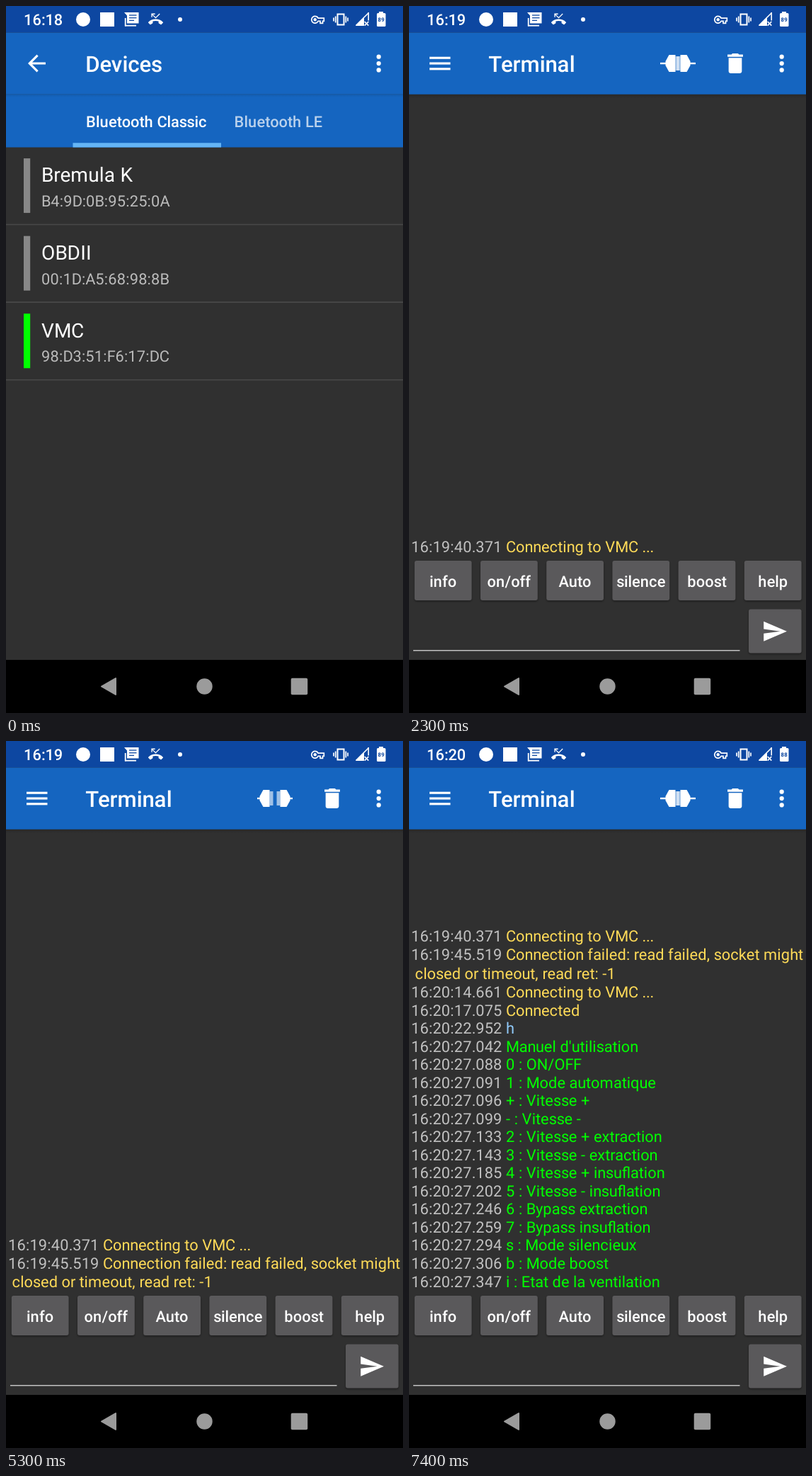
Write an HTML page with a canvas that moves like this. It is 561 px wide and 998 px high and loops after 8 s.

```html
<!DOCTYPE html>
<html lang="en">
<head>
<meta charset="utf-8">
<title>Bluetooth terminal</title>
<style>
  html, body { margin: 0; width: 100%; height: 100%; overflow: hidden; background: #303030; }
  canvas { display: block; width: 561px; height: 998px; }
</style>
</head>
<body>
<canvas id="stage"></canvas>
<script>
const W = 561, H = 998, LOOP = 8000;
const DP = W / 360, PHONE_PX = W / 720;
const canvas = document.getElementById('stage');
const ctx = canvas.getContext('2d');
const ratio = window.devicePixelRatio || 1;
canvas.width = W * ratio;
canvas.height = H * ratio;

const WHITE = '#fff', PANEL = '#303030', BAR = '#1565c0', STATUS = '#0d47a1';
const GREY = '#c1c1c1', YELLOW = '#ffdb58', GREEN = '#00ff00', BLUE = '#90caf9';
const STATUS_END = 24 * DP, BAR_END = 80 * DP, TABS_END = 128 * DP, BAR_MID = 52 * DP;
const SMALL = 14, LINE = 25.53, LAST_BASELINE = 770.5;

const ICONS = {
  back: 'M20 11H7.83l5.59-5.59L12 4l-8 8 8 8 1.41-1.41L7.83 13H20z',
  trash: 'M6 19c0 1.1.9 2 2 2h8c1.1 0 2-.9 2-2V7H6zM19 4h-3.5l-1-1h-5l-1 1H5v2h14z',
  send: 'M2 21 23 12 2 3v7l15 2-15 2z',
  missed: 'M6.5 5.5 12 11l7-7-1-1-6 6-4.5-4.5H11V3H5v6h1.5z' +
    'M.3 16.7Q5 12 12 12t11.7 4.7q.6.7 0 1.4l-2.5 2.5q-.7.6-1.4 0l-2.7-1.9q-.5-.3-.5-.9v-2.3' +
    'Q12 14.2 7.4 15.5v2.3q0 .6-.5.9l-2.7 1.9q-.7.6-1.4 0L.3 18.1q-.6-.7 0-1.4z'
};
for (const name in ICONS) ICONS[name] = new Path2D(ICONS[name]);

// Log entries: time, message, colour, optional wrapped remainder.
const LOG = [
  ['16:19:40.371', 'Connecting to VMC ...', YELLOW],
  ['16:19:45.519', 'Connection failed: read failed, socket might', YELLOW, ' closed or timeout, read ret: -1'],
  ['16:20:14.661', 'Connecting to VMC ...', YELLOW],
  ['16:20:17.075', 'Connected', YELLOW],
  ['16:20:22.952', 'h', BLUE],
  ['16:20:27.042', "Manuel d'utilisation", GREEN],
  ['16:20:27.088', '0 : ON/OFF', GREEN],
  ['16:20:27.091', '1 : Mode automatique', GREEN],
  ['16:20:27.096', '+ : Vitesse +', GREEN],
  ['16:20:27.099', '- : Vitesse -', GREEN],
  ['16:20:27.133', '2 : Vitesse + extraction', GREEN],
  ['16:20:27.143', '3 : Vitesse - extraction', GREEN],
  ['16:20:27.185', '4 : Vitesse + insuflation', GREEN],
  ['16:20:27.202', '5 : Vitesse - insuflation', GREEN],
  ['16:20:27.246', '6 : Bypass extraction', GREEN],
  ['16:20:27.259', '7 : Bypass insuflation', GREEN],
  ['16:20:27.294', 's : Mode silencieux', GREEN],
  ['16:20:27.306', 'b : Mode boost', GREEN],
  ['16:20:27.347', 'i : Etat de la ventilation', GREEN]
];

const DEVICES = [
  ['Bremula K', 'B4:9D:0B:95:25:0A', '#888'],
  ['OBDII', '00:1D:A5:68:98:8B', '#888'],
  ['VMC', '98:D3:51:F6:17:DC', GREEN]
];

const SCENES = [
  { until: 500, clock: '16:18', battery: '89', draw: drawDevices },
  { until: 3500, clock: '16:19', battery: '89', draw: () => drawTerminal(1, true) },
  { until: 6500, clock: '16:19', battery: '89', draw: () => drawTerminal(2, false) },
  { until: LOOP, clock: '16:20', battery: '88', draw: () => drawTerminal(LOG.length, true) }
];

function rect(x, y, w, h, color, radius = 0) {
  ctx.fillStyle = color;
  ctx.beginPath();
  ctx.roundRect(x, y, w, h, radius);
  ctx.fill();
}

function circle(x, y, r, color) {
  ctx.fillStyle = color;
  ctx.beginPath();
  ctx.arc(x, y, r, 0, Math.PI * 2);
  ctx.fill();
}

function polygon(color, ...points) {
  ctx.fillStyle = color;
  ctx.beginPath();
  points.forEach(([x, y]) => ctx.lineTo(x, y));
  ctx.closePath();
  ctx.fill();
}

function line(x1, y1, x2, y2, color, width) {
  ctx.strokeStyle = color;
  ctx.lineWidth = width;
  ctx.beginPath();
  ctx.moveTo(x1, y1);
  ctx.lineTo(x2, y2);
  ctx.stroke();
}

// Sets text in phone pixels, where kerned glyph advances are whole numbers.
function text(str, x, y, sp, color, weight = 400, align = 'left') {
  ctx.save();
  ctx.translate(x, y);
  ctx.scale(PHONE_PX, PHONE_PX);
  ctx.font = `${weight} ${sp * 2}px Roboto, sans-serif`;
  ctx.textRendering = 'geometricPrecision';
  ctx.fillStyle = color;
  const measure = s => ctx.measureText(s).width;
  const glyphs = str.match(/f[fil]|./g);
  const advances = glyphs.map((glyph, i) => {
    const next = glyphs[i + 1] || '';
    return Math.round(measure(glyph + next) - measure(next));
  });
  const width = advances.reduce((sum, advance) => sum + advance, 0);
  let pen = align === 'center' ? -width / 2 : 0;
  glyphs.forEach((glyph, i) => {
    ctx.fillText(glyph, pen, 0);
    pen += advances[i];
  });
  ctx.restore();
  return width * PHONE_PX;
}

// Draws a 24-unit icon centred on a point.
function icon(name, cx, cy, scale = DP) {
  ctx.save();
  ctx.translate(cx - 12 * scale, cy - 12 * scale);
  ctx.scale(scale, scale);
  ctx.fillStyle = WHITE;
  ctx.fill(ICONS[name]);
  ctx.restore();
}

function shadow(y, height, strength) {
  const fade = ctx.createLinearGradient(0, y, 0, y + height);
  fade.addColorStop(0, `rgba(0,0,0,${strength})`);
  fade.addColorStop(1, 'rgba(0,0,0,0)');
  ctx.fillStyle = fade;
  ctx.fillRect(0, y, W, height);
}

function drawStatusBar(clock, battery) {
  rect(0, 0, W, STATUS_END, STATUS);
  text(clock, 25, 27.3, SMALL, WHITE, 500);
  circle(109, 19, 10, WHITE);
  rect(133, 9, 20, 20, WHITE);

  // Stacked message sheets
  polygon(WHITE, [167, 9], [187.5, 9], [187.5, 24.5], [171, 24.5], [171, 13.5]);
  [13, 16.7, 20.4].forEach((y, i) => line(174, y, i < 2 ? 184.5 : 181, y, STATUS, 1.3));
  line(168.7, 17, 168.7, 28.5, WHITE, 1.8);
  line(168, 27.7, 184, 27.7, WHITE, 1.8);

  icon('missed', 211.5, 18.5, 0.88);
  circle(246, 19, 3, WHITE);

  // Key
  ctx.strokeStyle = WHITE;
  ctx.lineWidth = 1.7;
  ctx.beginPath();
  ctx.arc(436.7, 19.3, 4.9, 0.45, Math.PI * 2 - 0.45);
  ctx.lineTo(449.3, 17.2);
  ctx.lineTo(449.3, 21.4);
  ctx.lineTo(447.5, 21.4);
  ctx.lineTo(447.5, 24.3);
  ctx.lineTo(444, 24.3);
  ctx.lineTo(444, 21.4);
  ctx.closePath();
  ctx.stroke();
  circle(436.7, 19.3, 2.2, WHITE);

  // Vibrating phone
  ctx.lineWidth = 2;
  ctx.strokeRect(468.5, 11.5, 9, 15);
  for (const side of [-1, 1]) {
    line(473 + side * 7.3, 14.5, 473 + side * 7.3, 23.5, WHITE, 1.7);
    line(473 + side * 10, 16.5, 473 + side * 10, 21.5, WHITE, 1.7);
  }

  // Signal without data
  polygon(WHITE, [494, 28], [506, 16], [506, 28]);
  line(494.5, 27.5, 512.3, 9.8, WHITE, 1.6);
  line(512.2, 9, 512.2, 20.5, WHITE, 1.6);
  line(506.7, 22, 512.3, 27.6, WHITE, 1.7);
  line(512.3, 22, 506.7, 27.6, WHITE, 1.7);

  rect(527, 8, 6, 4, WHITE);
  rect(524, 10, 12.5, 19, WHITE, 1.5);
  text(battery, 530.2, 22.3, 5, STATUS, 700, 'center');
}

function drawAppBar(title) {
  rect(0, STATUS_END, W, BAR_END - STATUS_END, BAR);
  text(title, 72 * DP, 92.8, 20, WHITE, 500);
  for (const offset of [-6, 0, 6]) circle(526.7, BAR_MID + offset * DP, 2 * DP, WHITE);
}

function drawDevices() {
  rect(0, BAR_END, W, TABS_END - BAR_END, BAR);
  shadow(BAR_END, 4, 0.1);
  drawAppBar('Devices');
  icon('back', 43.5, BAR_MID);
  text('Bluetooth Classic', 113, 170.7, SMALL, WHITE, 500);
  text('Bluetooth LE', 322.5, 170.7, SMALL, '#b9d1ec', 500);
  rect(94.5, TABS_END - 4 * DP, 209.5, 4 * DP, '#64b5f6');

  DEVICES.forEach(([name, address, color], i) => {
    const y = TABS_END + i * 109.6;
    rect(25, y + 15.6, 9.2, 77, color);
    text(name, 50, y + 49, 18, WHITE);
    text(address, 50, y + 83.5, SMALL, '#bbb');
    rect(0, y + 108.3, W, 1.6, '#494949');
  });
}

function drawPlug(connected) {
  const gap = connected ? 3.5 : 7.5;
  const inner = gap - 5, shoulder = gap + 9, tip = gap + 14;
  for (const side of [-1, 1]) {
    const at = (x, y) => [380 + side * x, BAR_MID + y];
    polygon(WHITE, at(gap, -12), at(shoulder, -12), at(tip, -3), at(tip, 3), at(shoulder, 12), at(gap, 12));
    line(...at(tip - 1, 0), ...at(25, 0), WHITE, 2.4);
    polygon('rgba(255,255,255,.6)', at(inner, -10), at(gap, -10), at(gap, 10), at(inner, 10));
  }
}

function drawLog(count) {
  const entries = LOG.slice(0, count);
  const rows = entries.reduce((sum, entry) => sum + (entry[3] ? 2 : 1), 0);
  // A wrapped row followed by more entries carries extra leading.
  const extra = count > 2 ? 2 : 0;
  let y = LAST_BASELINE - (rows - 1) * LINE - extra;
  for (const [time, message, color, rest] of entries) {
    const width = text(time + ' ', 3, y, SMALL, GREY);
    text(message, 3 + width, y, SMALL, color);
    y += LINE;
    if (rest) {
      y += extra;
      text(rest, 3, y, SMALL, color);
      y += LINE;
    }
  }
}

function drawButton(x, y, w, h) {
  ctx.save();
  ctx.shadowColor = 'rgba(0,0,0,.4)';
  ctx.shadowBlur = 3 * ratio;
  ctx.shadowOffsetY = 1.5 * ratio;
  rect(x, y, w, h, '#5a595b', 3);
  ctx.restore();
}

function drawTerminal(logCount, connected) {
  drawAppBar('Terminal');
  shadow(BAR_END, 6, 0.15);
  for (const row of [-1, 0, 1]) rect(29, BAR_MID + (row * 5 - 1) * DP, 29.5, 2 * DP, WHITE);
  drawPlug(connected);
  icon('trash', 461, BAR_MID);
  drawLog(logCount);

  ['info', 'on/off', 'Auto', 'silence', 'boost', 'help'].forEach((label, i) => {
    const x = 7.8 + i * 93.2;
    drawButton(x, 783, 80.8, 56);
    text(label, x + 40.4, 819.5, SMALL, WHITE, 500, 'center');
  });
  drawButton(480, 851.5, 74.6, 62);
  icon('send', 516.8, 882.7);
  rect(6, 909, 461.5, 1.6, GREY);
}

function drawNavBar() {
  const grey = '#9b9b9b';
  rect(0, 923, W, 75, '#000');
  ctx.lineJoin = 'round';
  polygon(grey, [135, 960.5], [155, 949], [155, 972]);
  ctx.strokeStyle = grey;
  ctx.lineWidth = 2;
  ctx.stroke();
  ctx.lineJoin = 'miter';
  circle(280.5, 960.5, 11.2, grey);
  rect(402.7, 948.8, 23.5, 23.5, grey, 2);
}

function render(now) {
  const time = now % LOOP;
  const scene = SCENES.find(({ until }) => time < until);
  ctx.setTransform(ratio, 0, 0, ratio, 0, 0);
  rect(0, 0, W, H, PANEL);
  drawStatusBar(scene.clock, scene.battery);
  scene.draw();
  drawNavBar();
}

const start = performance.now();
function tick() {
  render(performance.now() - start);
  requestAnimationFrame(tick);
}
tick();
</script>
</body>
</html>
```
